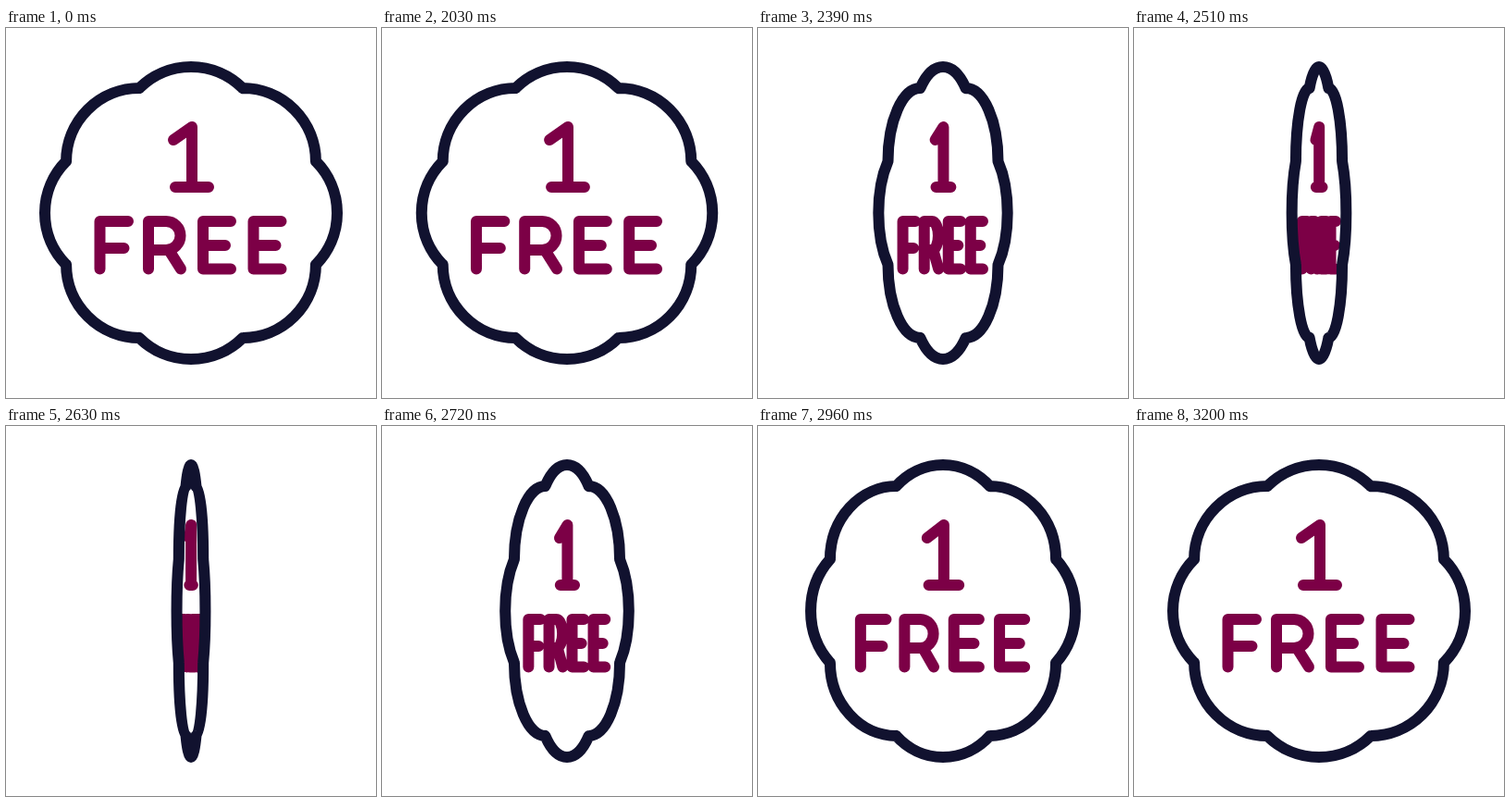
An HTML page with a canvas for the animation above (3230 ms loop, 400x400 px).

```html
<!DOCTYPE html>
<html lang="en">
<head>
<meta charset="utf-8">
<title>1 free badge</title>
<style>
  html, body { margin: 0; width: 100%; height: 100%; overflow: hidden; background: #fff; }
  canvas { display: block; width: 100vw; height: 100vh; }
</style>
</head>
<body>
<canvas id="stage" width="400" height="400" role="img" aria-label="1 free"></canvas>
<script>
const ctx = document.getElementById('stage').getContext('2d');
const LOOP = 3230, START = 2000, STEP = 30;
const NAVY = '#11122f', PLUM = '#7c0046';

// Scalloped ring of eight equal arcs around the centre
function badgePath() {
  const lobes = 8, peak = 158, r = 79.2, notch = 146;
  const ring = peak - r, half = Math.PI / lobes;
  const sweep = Math.atan2(notch * Math.sin(half), notch * Math.cos(half) - ring);
  const path = new Path2D();
  for (let i = 0; i < lobes; i++) {
    const a = i * 2 * half;
    path.arc(200 + ring * Math.cos(a), 200 + ring * Math.sin(a), r, a - sweep, a + sweep);
  }
  path.closePath();
  return path;
}

const letterE = x =>
  `M${x + 30} 209H${x}V260.5H${x + 30}M${x} 235H${x + 24}`;

const badge = badgePath();
const label = new Path2D([
  'M181 121L201 107V172M183 172H219',
  'M101.5 260.5V209H132M101.5 238H127.5',
  'M154 260.5V209H173A15.5 15.5 0 0 1 173 240H154M176 240L189 260.5',
  letterE(213),
  letterE(267.5)
].join(''));

// Horizontal scale: speeds up while closing, slows down while opening
function scaleAt(t) {
  const d = Math.floor((t - START) / STEP) * STEP;
  if (d <= 0) return 1;
  if (d <= 600) {
    const u = d / 600;
    return 1 - 0.98 * u * u * (2 - u);
  }
  const left = Math.max(0, (1200 - d) / 593);
  return Math.max(0.01, 1 - Math.pow(left, 2.6));
}

// Only the shape is squeezed; the line keeps its weight
function line(path, sx, color) {
  const squeezed = new Path2D();
  squeezed.addPath(path, new DOMMatrix([sx, 0, 0, 1, 200 * (1 - sx), 0]));
  ctx.strokeStyle = color;
  ctx.stroke(squeezed);
}

function draw(t) {
  const sx = scaleAt(t);
  ctx.fillStyle = '#fff';
  ctx.fillRect(0, 0, 400, 400);
  ctx.lineWidth = 12;
  ctx.lineCap = ctx.lineJoin = 'round';
  line(label, sx, PLUM);
  line(badge, sx, NAVY);
}

const begin = performance.now();
function tick() {
  draw((performance.now() - begin) % LOOP);
  requestAnimationFrame(tick);
}
tick();
</script>
</body>
</html>
```
